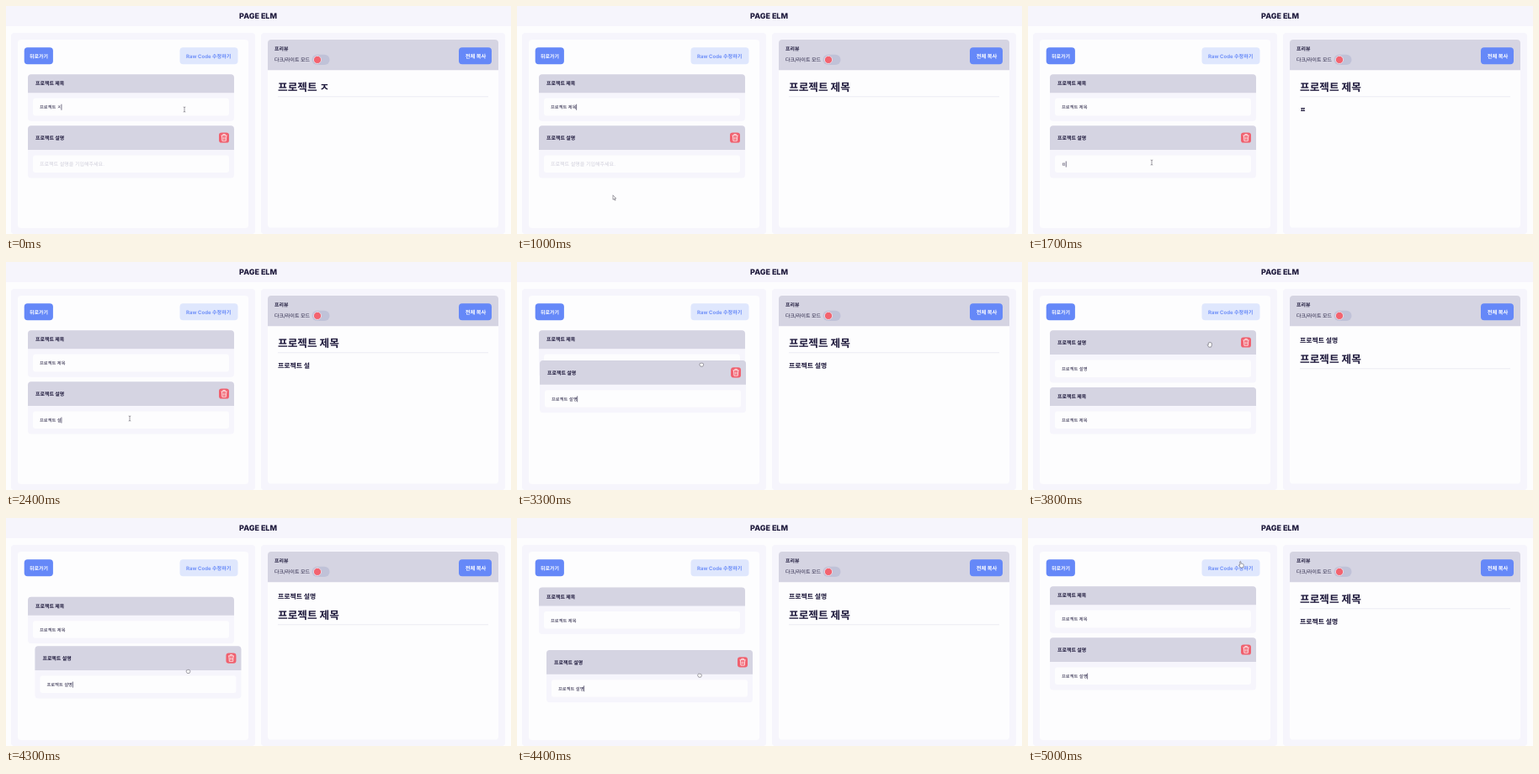
Recreate the animation shown at these times as an HTML page. Size 600 by 271 pixels, loop 5.1 s.

```html
<!DOCTYPE html>
<html lang="ko">
<head>
<meta charset="utf-8">
<style>
html, body { margin: 0; width: 100%; height: 100%; overflow: hidden; background: #fdfdfe; }
svg { display: block; width: 600px; height: 271px; }
text { font-family: Inter, "Noto Sans CJK KR", "Noto Sans CJK", sans-serif; fill: #1d183b; white-space: pre; text-rendering: geometricPrecision; }
.bold { font-weight: 700; }
.panel { fill: #f6f5fc; }
.inner { fill: #fdfdfe; }
.head { fill: #d5d4e2; }
.blue { fill: #6588f8; }
.cursor path { fill: #fff; stroke: #55535f; stroke-width: .55; stroke-linejoin: round; }
.cursor .beam { fill: none; }
</style>
</head>
<body>
<svg viewBox="0 0 600 271"></svg>
<script>
const svg = document.querySelector('svg');

const rect = (x, y, w, h, r, cls, extra = '') =>
  `<rect x="${x}" y="${y}" width="${w}" height="${h}" rx="${r}" class="${cls}" ${extra}/>`;

// Text placed by the middle of its line.
const label = (x, mid, size, str, cls = '', extra = '') =>
  `<text x="${x}" y="${mid + size * .37}" font-size="${size}" class="${cls}" ${extra}>${str}</text>`;

const topRound = (x, y, w, h, r) =>
  `<path class="head" d="M${x} ${y + h}v${r - h}q0 ${-r} ${r} ${-r}h${w - 2 * r}q${r} 0 ${r} ${r}v${h - r}z"/>`;

// Cards are drawn from their own top left corner.
const card = (id, name, headH, extra = '') => `<g id="${id}">
  ${rect(0, 0, 245, headH + 33.5, 4, 'panel')}
  ${topRound(0, 0, 245, headH, 4)}
  ${label(9, headH / 2, 5.95, name, 'bold')}
  ${rect(6, headH + 6.5, 233, 20.5, 3, 'inner')}
  ${label(14, headH + 17, 5.25, '', 'value')}
  <rect class="caret" y="${headH + 13.5}" width=".6" height="7" fill="#1d183b"/>
  ${extra}</g>`;

const trash = rect(227, 8.2, 12, 12.2, 3.2, '', 'fill="#f0616f"') +
  '<path d="M229.6 11.7h7M231.8 11.5v-1.2h2.6v1.2M230.4 11.9l.5 6.2h4.4l.5-6.2M232.2 13.5v3M234 13.5v3" fill="none" stroke="#fff" stroke-width=".75"/>';

const cursors = {
  beam: '<path class="beam" d="M-1.3-3q1.3 0 1.3 .7q0-.7 1.3-.7M0-2.6v5.2M-1.3 3q1.3 0 1.3-.7q0 .7 1.3 .7"/>',
  arrow: '<path d="M-1-3.2v5.4l1.3-1.1l.9 2l.9-.4l-.9-1.9h1.6z"/>',
  open: '<path d="M-1.3 3.1l-1.5-2.6q.2-.8 1.1 0v-2.3q.6-.8 1 0q.3-1.4 1-.5q.7-.7 1 .4q.9-.5 1 .5v2.4l-.8 2.1z"/>',
  closed: '<path d="M-1.2 2.2l-1-1.7l.1-1.6q.7-1 1.3-.5q.7-.8 1.2 0q.9-.5 1.1 .3q.8 0 .8 .7v1.2l-.8 1.6z"/>',
  point: '<path d="M-1 4l-2.1-3q.4-.9 1.4 .1v-4.2q.6-.9 1.1 0v2.5q.7-.6 1.1 .1q.8-.5 1.1 .3q.9-.2 1 .6v1.8l-.7 1.8z"/>'
};

const middle = 'text-anchor="middle"';

svg.innerHTML =
  rect(0, 0, 600, 24, 0, 'panel') +
  label(299.5, 11.6, 9, 'PAGE ELM', '', `font-weight="800" ${middle}`) +
  rect(6, 32, 290, 239, 4, 'panel') + rect(14, 40, 274, 224, 4, 'inner') +
  rect(303, 32, 290, 239, 4, 'panel') + rect(311, 40, 274, 223.5, 4, 'inner') +
  rect(21.7, 49.3, 34.2, 20, 4, 'blue') +
  label(39, 59.3, 5.95, '뒤로가기', 'bold', `${middle} style="fill:#fff"`) +
  rect(206.5, 49.3, 69, 20, 4, '', 'fill="#dfe7fd"') +
  label(240.7, 59.3, 6.05, 'Raw Code 수정하기', '', `font-weight="600" ${middle} style="fill:#6588f8"`) +
  topRound(311, 40, 274, 36.3, 4) +
  label(319, 51.2, 5.95, '프리뷰', 'bold') +
  label(319, 63.8, 5.95, '다크/라이트 모드') +
  rect(363.5, 57.8, 21, 12.2, 6.1, '', 'fill="#c0c2d8"') +
  '<circle cx="370" cy="63.9" r="4.6" fill="#f3636f" stroke="#e6dbe6"/>' +
  rect(538, 49.2, 39, 20, 4, 'blue') +
  label(558, 59.2, 6.3, '전체 복사', 'bold', `${middle} style="fill:#fff"`) +
  `<g id="h1">${label(323, 0, 12.65, '', 'bold')}<path d="M323 11.2h250" stroke="#e4e3ee" stroke-width=".7"/></g>` +
  `<g id="h3">${label(323, 0, 7.85, '', 'bold')}</g>` +
  card('title', '프로젝트 제목', 22) +
  card('desc', '프로젝트 설명', 28.8, trash) +
  '<g class="cursor"></g>';

const $ = sel => svg.querySelector(sel);
const pointer = $('.cursor');
const clamp = (v, lo, hi) => Math.min(Math.max(v, lo), hi);

// Every state of a Hangul text as its letters are keyed in.
function strokes(str) {
  const initials = 'ㄱㄲㄴㄷㄸㄹㅁㅂㅃㅅㅆㅇㅈㅉㅊㅋㅌㅍㅎ';
  return [...str].flatMap((ch, i) => {
    const base = 0xAC00, code = ch.charCodeAt(0) - base;
    const stages = code < 0 ? [ch] : [
      initials[Math.floor(code / 588)],
      String.fromCharCode(base + code - code % 28),
      ch
    ];
    return [...new Set(stages)].map(s => str.slice(0, i) + s);
  });
}

const titleKeys = strokes('제목');
const descKeys = ['', ...strokes('프로젝트 설명')];
const typed = (keys, elapsed, pace) => keys[clamp(Math.floor(elapsed / pace), 0, keys.length - 1)];

// Ease out along legs of [start, end, x, y].
const follow = (from, legs, t) => legs.reduce(([x, y], [start, end, toX, toY]) => {
  const p = 1 - (1 - clamp((t - start) / (end - start), 0, 1)) ** 2;
  return [x + (toX - x) * p, y + (toY - y) * p];
}, from);

const mouseLegs = [
  [800, 1000, 115, 228], [1500, 1700, 147, 186], [2700, 3200, 218, 147], [3200, 3630, 221, 86],
  [3630, 3800, 216, 98], [3800, 4000, 208, 111], [4000, 4400, 217, 187], [4400, 5000, 253.5, 55]
];
const titleLegs = [[3300, 3600, 26, 149], [4100, 4450, 26, 81.2]];
const descLegs = [
  [3200, 3630, 28.5, 81], [3630, 3700, 26, 81.2], [4000, 4400, 35, 157], [4400, 4600, 26, 142.2]
];

function cursorAt(t) {
  if (t < 900 || (t >= 1600 && t < 2900)) return 'beam';
  if (t < 1600) return 'arrow';
  if (t >= 4800) return 'point';
  const dragging = (t >= 3200 && t < 3600) || (t >= 4000 && t < 4500);
  return dragging ? 'closed' : 'open';
}

const move = (el, x, y) => el.setAttribute('transform', `translate(${x} ${y})`);

function fill(id, str, caretOn, hint) {
  const box = $(id), value = box.querySelector('.value'), caret = box.querySelector('.caret');
  value.textContent = str || hint;
  value.setAttribute('font-size', str ? 5.25 : 6);
  value.style.fill = str ? '' : '#cfcedb';
  caret.setAttribute('x', 14 + (str ? value.getComputedTextLength() : 0));
  caret.style.display = caretOn ? '' : 'none';
}

function render(now) {
  const t = Math.floor(now % 5100 / 100) * 100;
  const title = '프로젝트 ' + typed(titleKeys, t, 150);
  const desc = typed(descKeys, t - 1600, 60);
  const inDesc = t >= 1600;
  const typing = t < 800 || (inDesc && t < 2700);
  const caretOn = typing || t % 1000 < 500;
  const swapped = t >= 3600 && t < 4600;

  fill('#title', title, caretOn && !inDesc, '');
  fill('#desc', desc, caretOn && inDesc, '프로젝트 설명을 기입해주세요.');
  move($('#title'), ...follow([26, 81.2], titleLegs, t));
  move($('#desc'), ...follow([26, 142.2], descLegs, t));

  $('#h1 text').textContent = title;
  $('#h3 text').textContent = desc;
  move($('#h1'), 0, swapped ? 115.6 : 96.6);
  move($('#h3'), 0, swapped ? 93.5 : 123);

  pointer.innerHTML = cursors[cursorAt(t)];
  move(pointer, ...follow([212, 123], mouseLegs, t));
}

const start = performance.now();
(function loop() {
  render(performance.now() - start);
  requestAnimationFrame(loop);
})();
</script>
</body>
</html>
```
